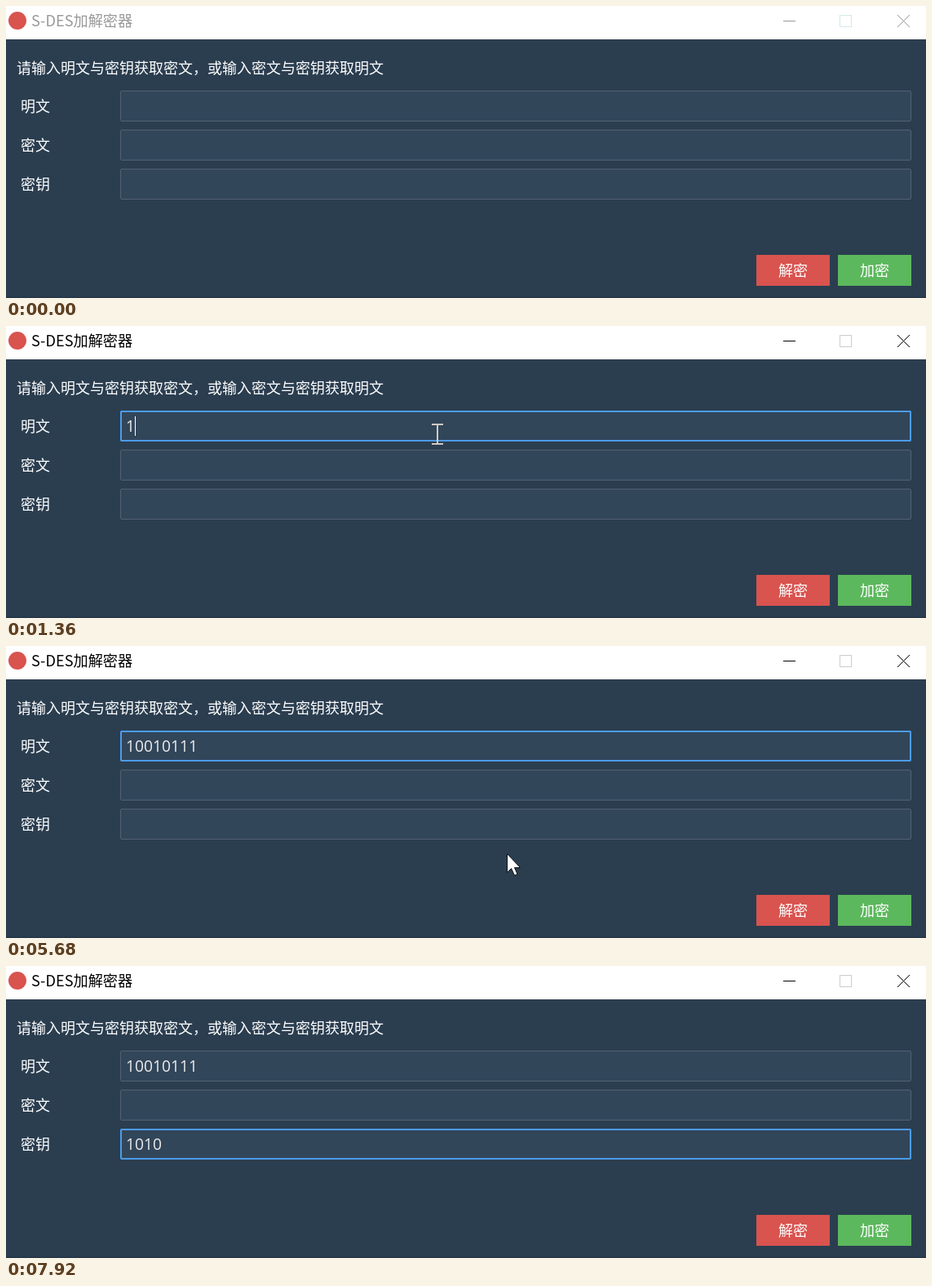
These frames come from a looping animation (1128 by 359 pixels, 8000 ms). An HTML page:

```html
<!DOCTYPE html>
<html lang="zh-CN">
<head>
<meta charset="utf-8">
<title>S-DES加解密器</title>
<style>
  html, body { margin: 0; width: 100%; height: 100%; overflow: hidden; background: #2b3e50; }
  svg { display: block; width: 1128px; height: 359px; }
  text { font: 18px "Noto Sans CJK SC", "Noto Sans CJK", sans-serif; fill: #fff; white-space: pre; }
  .title { font-size: 18.2px; fill: #000; }
  .value { font: 19.23px "Open Sans", "Noto Sans", sans-serif; fill: #ebebeb; }
  .controls { fill: none; stroke: #000; }
  .controls .max { stroke: #ccc; }
  .inactive .title { fill: #999; }
  .inactive .controls { stroke: #999; }
  .inactive .controls .max { stroke: #d3e8ea; }
  .box { fill: #32465a; stroke: #526170; }
  .hover .box { stroke: #4c9be8; }
  .ring { fill: none; stroke: #4c9be8; stroke-width: 2; visibility: hidden; }
  .focus .ring { visibility: visible; }
  .caret { fill: #fff; }
  .beam { fill: none; stroke: #cfc9c2; stroke-width: 2; }
  .arrow { fill: #fff; stroke: #111; }
</style>
</head>
<body>
<svg id="stage" viewBox="0 0 1128 359">
  <rect width="1128" height="41" fill="#fff"/>
  <circle cx="14" cy="18" r="11" fill="#d9534f"/>
  <text class="title" x="31" y="25">S-DES加解密器</text>
  <g class="controls">
    <path d="M953 18.5H968M1093 11L1108 26M1108 11L1093 26"/>
    <rect class="max" x="1022.5" y="11.5" width="14" height="14"/>
  </g>
  <rect y="41" width="1128" height="318" fill="#2b3e50"/>
  <rect y="357" width="1128" height="2" fill="#263849"/>
  <text x="13" y="82.5">请输入明文与密钥获取密文，或输入密文与密钥获取明文</text>
  <g id="rows"></g>
  <rect x="920" y="306" width="90" height="38" fill="#d9534f"/>
  <text x="965" y="332" text-anchor="middle">解密</text>
  <rect x="1020" y="306" width="90" height="38" fill="#5cb85c"/>
  <text x="1065" y="332" text-anchor="middle">加密</text>
  <g id="pointer">
    <path class="beam" d="M-7 -12H7M0 -12V12M-7 12H7"/>
    <path class="arrow" d="M.5 .5V23.5L5.5 18.5L9.5 27L13 25.5L9.5 17.5H16.5Z"/>
    <circle class="click" cx="-3" cy="-1" r="18" fill="#ffeb00" opacity=".5"/>
  </g>
</svg>
<script>
const LOOP = 8000;
const TOP = [104, 152, 200];
const PLAIN = 0, KEY = 2;

// [time, focused row, typed text, caret shown]
const edits = [
  [0, -1, '', 0],
  [490, PLAIN, '', 1], [830, PLAIN, '1', 1], [1090, PLAIN, '1', 0], [1360, PLAIN, '1', 1],
  [1700, PLAIN, '10', 1], [1830, PLAIN, '100', 1], [1960, PLAIN, '1001', 0],
  [2150, PLAIN, '1001', 1], [2280, PLAIN, '10010', 1], [2870, PLAIN, '10010', 0],
  [3210, PLAIN, '10010', 1], [3810, PLAIN, '10010', 0], [3940, PLAIN, '100101', 0],
  [4070, PLAIN, '100101', 1], [4470, PLAIN, '1001011', 1], [4740, PLAIN, '1001011', 0],
  [5010, PLAIN, '1001011', 1], [5130, PLAIN, '10010111', 1], [5470, PLAIN, '10010111', 0],
  [6440, KEY, '', 1], [7040, KEY, '1', 0], [7250, KEY, '1', 1], [7320, KEY, '10', 1],
  [7590, KEY, '101', 1], [7790, KEY, '1010', 1], [7920, KEY, '1010', 0]
];

// [time, x, y]; without a place the pointer is hidden
const moves = [
  [0],
  [70, 700, 340], [140, 664, 280], [210, 617, 215], [280, 560, 172], [350, 535, 140], [420, 529, 133],
  [5470, 560, 141], [5540, 640, 160], [5610, 690, 188], [5680, 614, 255], [5750, 585, 276],
  [5820, 568, 283], [5890, 566, 268], [5960, 568, 248], [6030, 567, 234], [6100, 566, 228],
  [6170, 565, 226], [6240, 565, 225],
  [6580, 711, 233], [6650]
];
const clicks = [490, 6440];

const $ = (sel, root = document) => root.querySelector(sel);
const show = (el, on) => el.setAttribute('visibility', on ? 'visible' : 'hidden');
const latest = (list, t) => list.findLast(item => item[0] <= t);

$('#rows').innerHTML = ['明文', '密文', '密钥'].map((label, i) => `
  <g>
    <text x="18" y="${TOP[i] + 26}">${label}</text>
    <rect class="box" x="140.5" y="${TOP[i] + .5}" width="969" height="37" rx="1.5"/>
    <rect class="ring" x="141" y="${TOP[i] + 1}" width="968" height="36" rx="1"/>
    <text class="value" x="147" y="${TOP[i] + 26}"></text>
    <rect class="caret" y="${TOP[i] + 7}" width="1" height="24"/>
  </g>`).join('');

const stage = $('#stage'), pointer = $('#pointer');
const rows = [...$('#rows').children].map(el => ({
  el, value: $('.value', el), caret: $('.caret', el)
}));

function draw(t) {
  const [, focus, typed, caretOn] = latest(edits, t);
  const [, x, y] = latest(moves, t);
  const visible = x !== undefined;
  const hover = TOP.findIndex(top => x >= 140 && x < 1110 && y >= top && y < top + 38);
  const plain = latest(edits.filter(e => e[1] !== KEY), t)[2];
  const values = [plain, '', focus === KEY ? typed : ''];

  stage.classList.toggle('inactive', focus < 0);
  rows.forEach(({ el, value, caret }, i) => {
    el.classList.toggle('focus', i === focus);
    el.classList.toggle('hover', i === hover);
    value.textContent = values[i];
    caret.setAttribute('x', 147 + 11 * values[i].length);
    show(caret, i === focus && caretOn);
  });

  if (visible) pointer.setAttribute('transform', `translate(${x} ${y})`);
  show($('.beam', pointer), visible && hover >= 0);
  show($('.arrow', pointer), visible && hover < 0);
  show($('.click', pointer), clicks.some(c => t >= c && t < c + 70));
}

const start = performance.now();
function tick() {
  draw((performance.now() - start) % LOOP);
  requestAnimationFrame(tick);
}
tick();
</script>
</body>
</html>
```
